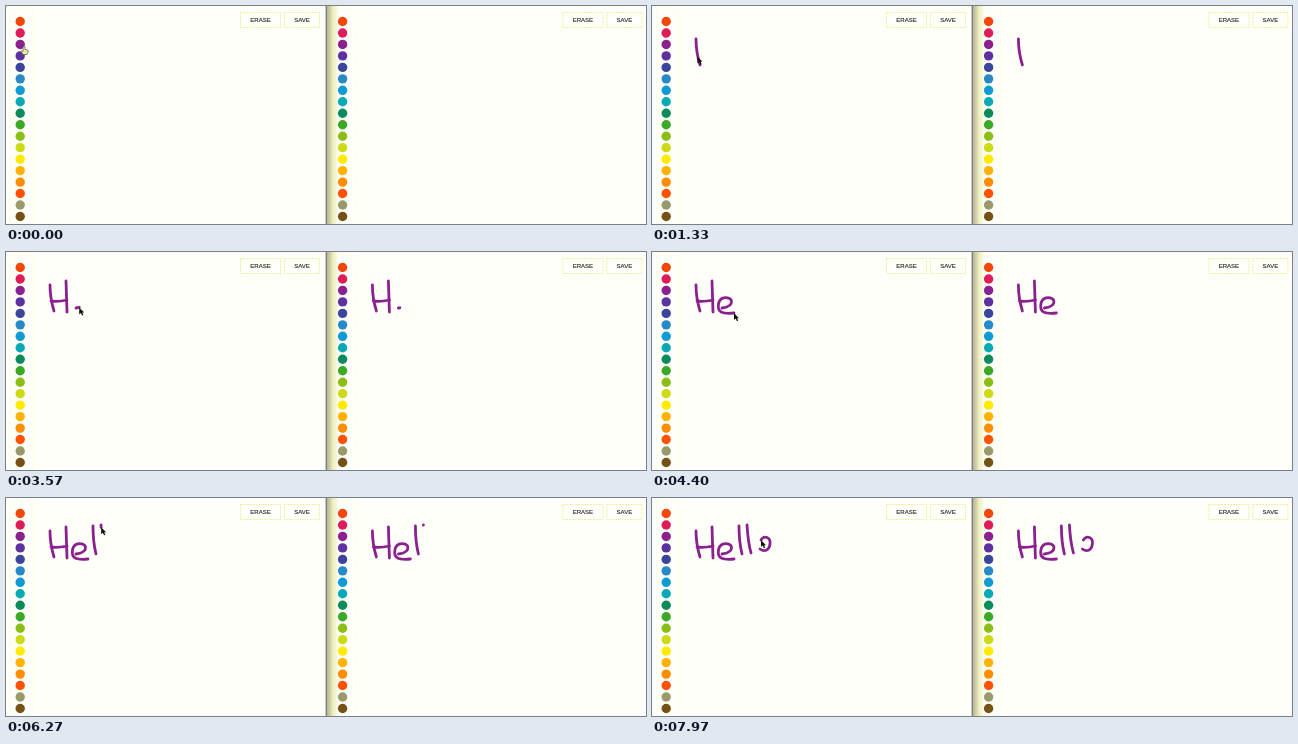
These frames come from a looping animation (640x218 px, 8000 ms). An HTML page:

```html
<!DOCTYPE html>
<html lang="en">
<head>
<meta charset="utf-8">
<title>Shared drawing</title>
<style>
  html, body { margin: 0; width: 100%; height: 100%; overflow: hidden; background: #fffffa; }
  svg { display: block; }
  text { font: 6px "Liberation Sans", Arial, sans-serif; fill: #222216; stroke: #222216; stroke-width: .12; text-anchor: middle; }
  .frame { fill: #fffffc; stroke: #eeee9c; stroke-dasharray: 2 1; }
  .palette { fill: none; stroke: #f8f8c8; stroke-dasharray: 1 2; }
  .ink { fill: none; stroke: #8b218f; stroke-width: 2.8; stroke-linecap: round; stroke-linejoin: round; }
</style>
</head>
<body>
<svg width="640" height="218" viewBox="0 0 640 218">
  <defs>
    <linearGradient id="shade">
      <stop offset="0" stop-color="#aaaa92"/>
      <stop offset=".55" stop-color="#eeeebc"/>
      <stop offset="1" stop-color="#fffffa"/>
    </linearGradient>
  </defs>
  <rect width="640" height="218" fill="#fffffa"/>
  <rect x="320" width="13" height="218" fill="url(#shade)"/>
  <rect x="319.6" width="1.2" height="218" fill="#777770"/>
  <g id="panels"></g>
  <g id="cursor">
    <path id="arrow" d="M0 0V7L1.7 5.6L2.9 8.2L4.2 7.6L3 5.2H5Z" fill="#111"/>
    <path id="hand" d="M-1 0Q0-1 1 0V2.5L4 3.2V5.5L3 7.5H-1L-3 4.5L-2.3 3.5L-1 4.5Z" fill="#e8e8b0" stroke="#6d6d45" stroke-width=".8"/>
  </g>
</svg>
<script>
const LOOP = 8000, REST = 80, ECHO_DELAY = 30, PALETTE_EDGE = 21;
const home = { x: 18, y: 41 };
const colors = `#f34709 #df1b58 #8b218f #5d319f #3b459b #2789c5 #119bd4 #09aab5 #098b5c
  #3ba926 #8cbe18 #cddb16 #ffeb00 #ffb300 #ff8d00 #ff5100 #999969 #755116`.split(/\s+/);

// Pen strokes; the cursor travels by itself from one to the next
const strokes = [
  { start: 620, end: 1160, d: 'M44 33Q44 46 48 59' },
  { start: 1390, end: 1830, d: 'M45 49Q52 50 61 48' },
  { start: 2300, end: 2800, d: 'M60 29L61 60' },
  { start: 3520, end: 4350, d: 'M70 56C77 55 80 53 79.5 49S68 43 66.5 52S71 62 82 61' },
  { start: 5000, end: 5300, d: 'M87 28Q87 44 90 56' },
  { start: 6240, end: 6650, d: 'M95 27Q96 44 99 55' },
  { start: 7180, end: 7930, d: 'M108 51C112 54 117 53 118 46S112 37 109 42' }
];

const button = (x, width, label) =>
  `<rect class="frame" x="${x + .5}" y="6.5" width="${width}" height="15"/>
   <text x="${x + .5 + width / 2}" y="16.2">${label}</text>`;

const panel = x => `<g transform="translate(${x})">
  <rect class="palette" x="4.5" y="3.5" width="22" height="220"/>
  ${colors.map((c, i) => `<circle cx="14.2" cy="${15.5 + i * 11.47}" r="4.7" fill="${c}"/>`).join('')}
  ${button(234, 40, 'ERASE')}${button(278, 35, 'SAVE')}
  ${strokes.map(s => `<path class="ink" d="${s.d}" pathLength="1"/>`).join('')}</g>`;

const byId = id => document.getElementById(id);
byId('panels').innerHTML = panel(0) + panel(322.4);
const [inks, echoes] = [...byId('panels').children].map(g => g.querySelectorAll('.ink'));

const progress = (t, start, end) => Math.max(0, Math.min(1, (t - start) / (end - start)));
const easeOut = u => 1 - (1 - u) ** 2;

function pointOn(i, u) {
  return inks[i].getPointAtLength(u * inks[i].getTotalLength());
}

function cursorAt(t) {
  const next = strokes.findIndex(s => t < s.end);
  if (next < 0) return pointOn(strokes.length - 1, 1);
  const { start, end } = strokes[next];
  if (t >= start) return pointOn(next, progress(t, start, end));
  const from = next ? pointOn(next - 1, 1) : home;
  const left = next ? strokes[next - 1].end : 0;
  const to = pointOn(next, 0);
  const u = easeOut(progress(t, left + REST, start));
  return { x: from.x + (to.x - from.x) * u, y: from.y + (to.y - from.y) * u };
}

function showInk(paths, t) {
  strokes.forEach(({ start, end }, i) => {
    const u = progress(t, start, end);
    paths[i].style.display = u > 0 ? '' : 'none';
    paths[i].style.strokeDasharray = u < 1 ? `${u} 2` : 'none';
  });
}

function draw(t) {
  showInk(inks, t);
  showInk(echoes, t - ECHO_DELAY);
  const { x, y } = cursorAt(t);
  byId('cursor').setAttribute('transform', `translate(${x} ${y})`);
  byId('hand').style.display = x < PALETTE_EDGE ? '' : 'none';
  byId('arrow').style.display = x < PALETTE_EDGE ? 'none' : '';
}

const origin = performance.now();
function frame() {
  draw((performance.now() - origin) % LOOP);
  requestAnimationFrame(frame);
}
frame();
</script>
</body>
</html>
```
